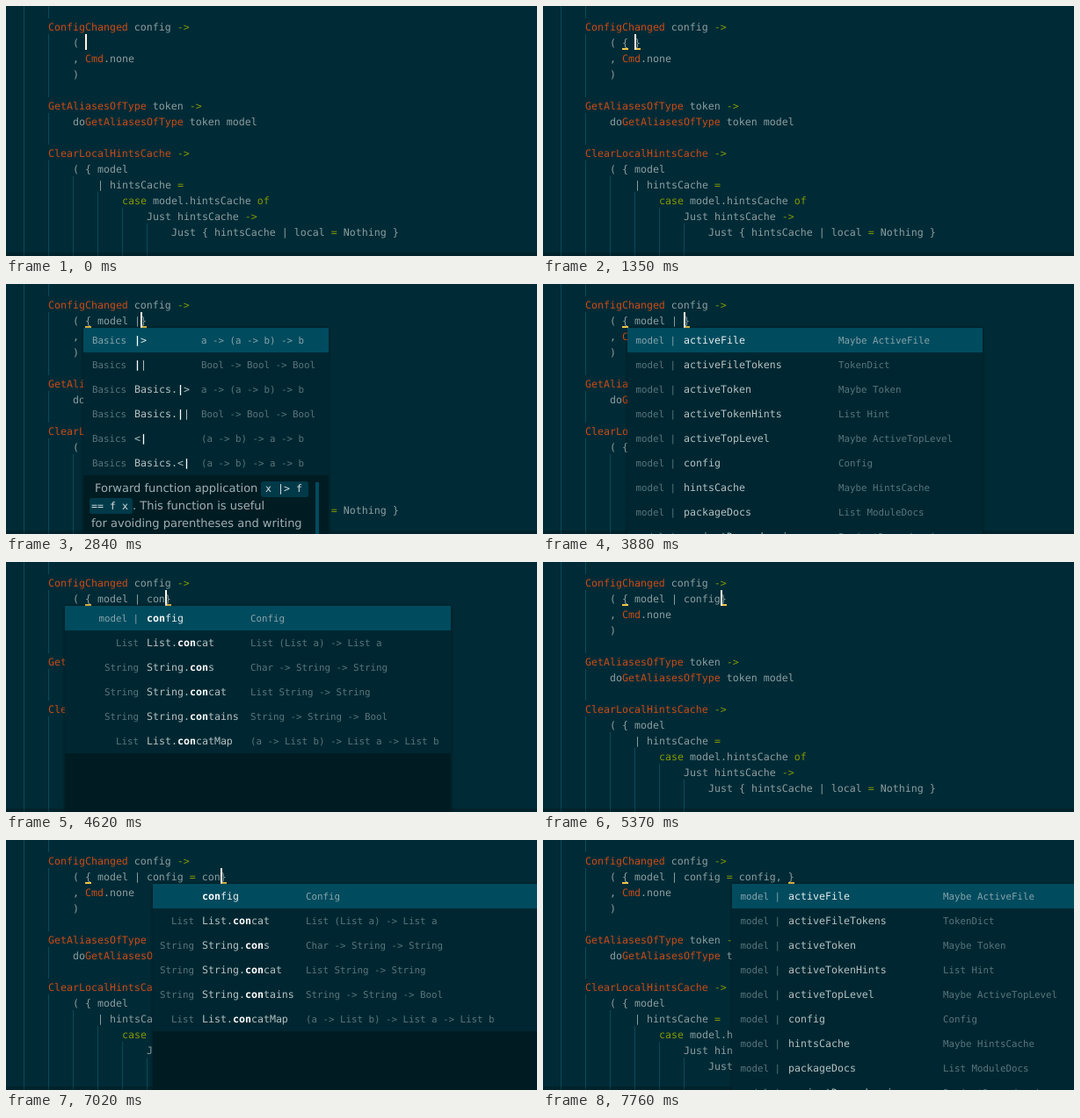
An HTML page that plays this animation: 604 px wide and 285 px high, repeating every 8000 ms.

```html
<!DOCTYPE html>
<html>
<head>
<meta charset="utf-8">
<style>
html, body { margin: 0; width: 100%; height: 100%; overflow: hidden; background: #002b36; }
svg { display: block; }
text { font: 11.627px "DejaVu Sans Mono", monospace; fill: #8c9da0; white-space: pre; text-rendering: geometricPrecision; }
.name { fill: #cb4b16; }
.key { fill: #859900; }
.popup { filter: drop-shadow(0 0 2px #0006); }
.word { fill: #b3c1c3; }
.side { font-size: 10.8px; fill: #58747c; }
.on .word { fill: #e3eced; }
.on .side { fill: #86a3aa; }
.hit { fill: #fff; font-weight: bold; }
.doc { font: 13px "DejaVu Sans", sans-serif; fill: #9fb0b3; }
.code { fill: #d5e0e1; }
</style>
</head>
<body>
<svg id="stage" width="604" height="285"></svg>
<script>
const LOOP = 8000, TEAL = '#004b5e';
const stage = document.getElementById('stage');

// [line, column, text]
const code = [
  [0, 4, 'ConfigChanged config ->'],
  [1, 8, '('],
  [2, 8, ', Cmd.none'],
  [3, 8, ')'],
  [5, 4, 'GetAliasesOfType token ->'],
  [6, 8, 'doGetAliasesOfType token model'],
  [8, 4, 'ClearLocalHintsCache ->'],
  [9, 8, '( { model'],
  [10, 12, '| hintsCache ='],
  [11, 16, 'case model.hintsCache of'],
  [12, 20, 'Just hintsCache ->'],
  [13, 24, 'Just { hintsCache | local = Nothing }']
];
// [x, top, bottom]
const guides = [[20, 0, 285], [48, 0, 14], [48, 32, 104], [48, 122, 158], [48, 176, 285],
  [76, 194, 285], [104, 212, 285], [132, 230, 285], [160, 248, 285]];

const types = {
  activeFile: 'Maybe ActiveFile', activeFileTokens: 'TokenDict', activeToken: 'Maybe Token',
  activeTokenHints: 'List Hint', activeTopLevel: 'Maybe ActiveTopLevel', config: 'Config',
  hintsCache: 'Maybe HintsCache', packageDocs: 'List ModuleDocs', projectDependencies: 'ProjectDependencies'
};
// rows: [label, word, type]
const fields = Object.keys(types).map(k => ['model |', k, types[k]]);
const paths = [['', 'model', 'Model'],
  ...'config activeFile hintsCache activeToken packageDocs activeTopLevel activeTokenHints activeFileTokens'
    .split(' ').map(k => ['', 'model.' + k, types[k]])];
const basics = (word, type) => ['Basics', word, type];
const pipe = 'a -> (a -> b) -> b', back = '(a -> b) -> a -> b', or = 'Bool -> Bool -> Bool';
const same = 'a -> a -> Bool', order = 'comparable -> comparable -> Bool';
const library = [
  ['List', 'List.concat', 'List (List a) -> List a'],
  ['String', 'String.cons', 'Char -> String -> String'],
  ['String', 'String.concat', 'List String -> String'],
  ['String', 'String.contains', 'String -> String -> Bool'],
  ['List', 'List.concatMap', '(a -> List b) -> List a -> List b']
];

const popups = {
  wide: { left: 96, word: 104, type: 323, right: 602, hit: 'mod', rows: paths, bar: true },
  model: { left: 96, word: 104, type: 323, right: 494, hit: 'model', rows: paths, bar: true },
  pipes: { left: 88, word: 146, type: 222, right: 367, hit: '|', doc: true, rows: [
    basics('|>', pipe), basics('||', or), basics('Basics.|>', pipe),
    basics('Basics.||', or), basics('<|', back), basics('Basics.<|', back)] },
  fields: { left: 96, word: 160, type: 336, right: 500, rows: fields },
  con: { left: 67, word: 160, type: 278, right: 506, hit: 'con',
    rows: [['model |', 'config', 'Config'], ...library] },
  equals: { left: 151, word: 209, type: 285, right: 507, hit: '=', rows: [
    basics('==', same), basics('Basics.==', same), basics('/=', same), basics('<=', order),
    basics('>=', order), basics('Basics./=', same), basics('Basics.<=', order), basics('Basics.>=', order)] },
  config: { left: 167, word: 223, type: 341, right: 612, hit: 'con',
    rows: [['', 'config', 'Config'], ...library] },
  last: { left: 215, word: 279, type: 455, right: 620, rows: fields }
};

// [time, text before the cursor, cursor shown, popup]
const steps = [
  [0, '', 1],
  [450, '{', 1],
  [600, '{', 1],
  [1050, '{', 0],
  [1350, '{ ', 1],
  [1500, '{ mo', 1],
  [1650, '{ mod', 1, 'wide'],
  [1790, '{ model', 1, 'model'],
  [1940, '{ model ', 1],
  [2240, '{ model ', 0],
  [2690, '{ model |', 1],
  [2840, '{ model |', 1, 'pipes'],
  [3130, '{ model | ', 1, 'fields'],
  [3430, '{ model | ', 0, 'fields'],
  [3880, '{ model | ', 1, 'fields'],
  [4340, '{ model | c', 1, 'fields'],
  [4490, '{ model | co', 1, 'con'],
  [4620, '{ model | con', 1, 'con'],
  [4920, '{ model | con', 0, 'con'],
  [5370, '{ model | config', 1],
  [5670, '{ model | config ', 1],
  [6120, '{ model | config =', 1, 'equals'],
  [6270, '{ model | config = ', 1],
  [6570, '{ model | config = ', 0],
  [6870, '{ model | config = c', 1],
  [7020, '{ model | config = con', 1, 'config'],
  [7170, '{ model | config = config', 1, 'config'],
  [7310, '{ model | config = config,', 1],
  [7460, '{ model | config = config, ', 1, 'last'],
  [7760, '{ model | config = config, ', 0, 'last']
];

const esc = s => s.replace(/</g, '&lt;').replace(/>/g, '&gt;');
const rect = (x, y, w, h, fill, more = '') =>
  `<rect x="${x}" y="${y}" width="${w}" height="${h}" fill="${fill}" ${more}/>`;
const text = (x, y, body, cls = '', more = '') => `<text x="${x}" y="${y}" class="${cls}" ${more}>${body}</text>`;
const span = (cls, s) => `<tspan class="${cls}">${esc(s)}</tspan>`;

const paint = s => s.split(/(ConfigChanged|GetAliasesOfType|ClearLocalHintsCache|Cmd|->|=|\bcase\b|\bof\b)/)
  .map((part, i) => i % 2 ? span(/^[A-Z]/.test(part) ? 'name' : 'key', part) : esc(part)).join('');

function mark(word, hit) {
  const at = hit ? word.indexOf(hit) : -1;
  if (at < 0) return esc(word);
  return esc(word.slice(0, at)) + span('hit', hit) + esc(word.slice(at + hit.length));
}

function drawDoc(p) {
  return rect(p.left, 218, p.right - p.left, 67, '#001c23') +
    rect(290, 225, 54, 18, '#003a49', 'rx="3"') + rect(95, 244, 49, 18, '#003a49', 'rx="3"') +
    text(101, 237, 'Forward function application', 'doc') + text(295, 237, 'x |&gt; f', 'code') +
    text(97, 257, '== f x', 'code') + text(144, 257, '. This function is useful', 'doc') +
    text(97, 277, 'for avoiding parentheses and writing', 'doc') + rect(352, 226, 4, 59, TEAL);
}

function drawPopup(p) {
  const width = p.right - p.left, height = 28 * p.rows.length;
  let out = rect(p.left, 50, width, height, '#002731') +
    rect(p.left, 50, width - (p.bar ? 7 : 0), 28, TEAL);
  p.rows.forEach(([label, word, type], i) => {
    const y = 68 + 28 * i;
    out += `<g class="${i ? '' : 'on'}">` + text(p.word - 9, y, label, 'side', 'text-anchor="end"') +
      text(p.word, y, mark(word, p.hit), 'word') + text(p.type, y, esc(type), 'side') + '</g>';
  });
  if (p.bar) out += rect(p.right - 4, 53, 4, 232, TEAL);
  if (p.doc) out += drawDoc(p);
  else if (height < 235) out += rect(p.left, 50 + height, width, 235 - height, '#001c23');
  return `<g class="popup">${out}</g>`;
}

function draw([time, typed, cursor, popup]) {
  const end = 90 + 7 * typed.length;
  let out = guides.map(([x, top, bottom]) => rect(x, top, 1, bottom - top, '#0a4a59')).join('') +
    code.map(([line, col, s]) => text(20 + 7 * col, 28 + 18 * line, paint(s))).join('');
  if (typed) out += text(90, 46, paint(typed + '}'));
  if (time >= 600) out += rect(90, 48, 7, 2, '#f0c648') + rect(end, 48, 7, 2, '#f0c648');
  if (cursor) out += rect(end, 32, 2, 18, '#fdf6e3');
  out += rect(0, 281, 604, 4, '#000', 'opacity=".18"');
  if (popup) out += drawPopup(popups[popup]);
  stage.innerHTML = out;
}

let shown;
function tick() {
  const t = performance.now() % LOOP;
  const step = steps.filter(s => s[0] <= t).pop();
  if (step !== shown) draw(shown = step);
  requestAnimationFrame(tick);
}
tick();
</script>
</body>
</html>
```
